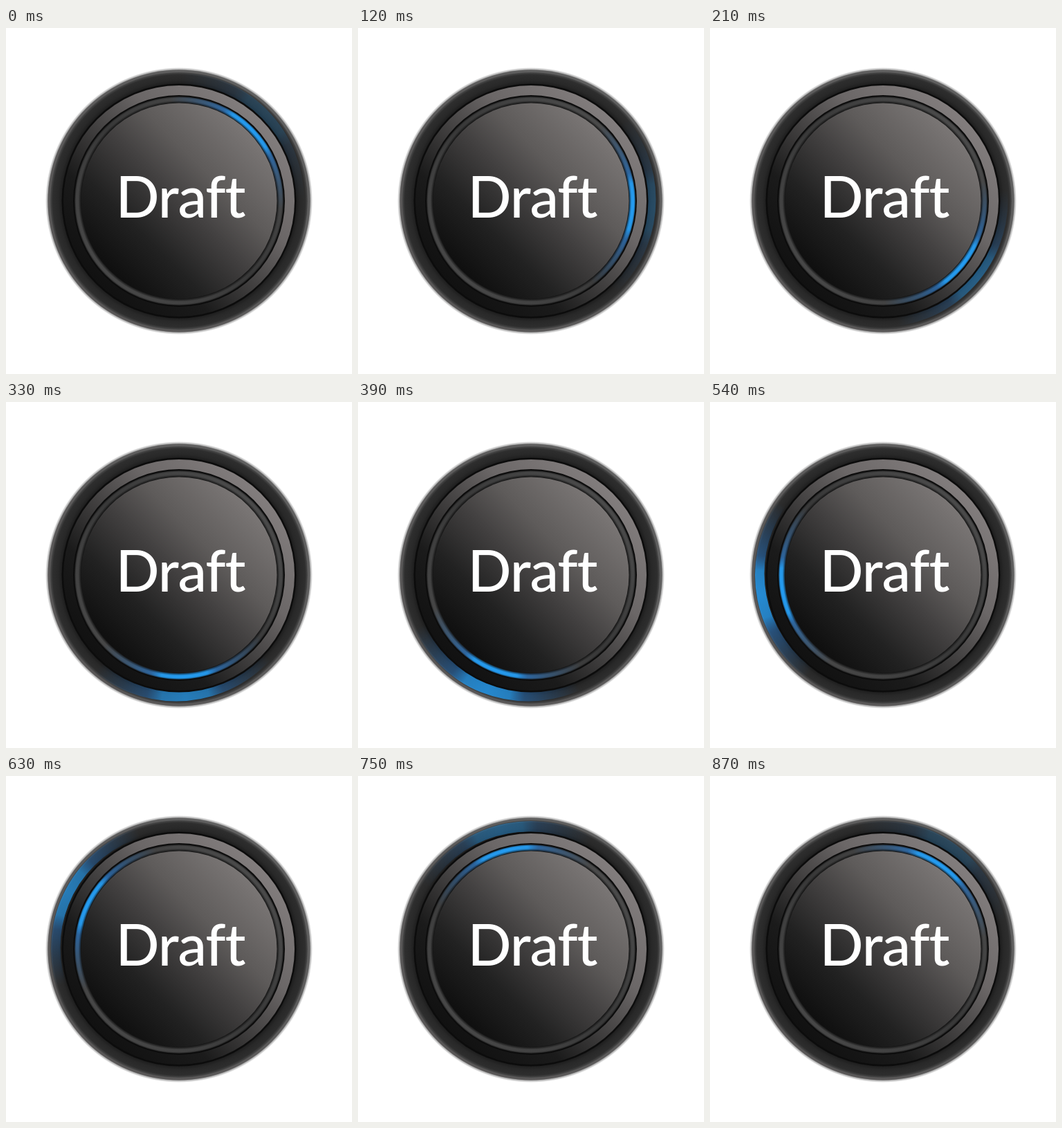
Recreate the animation shown at these times as an HTML page with a canvas. Size 500x500 px, loop 900 ms.

```html
<!DOCTYPE html>
<html lang="en">
<head>
<meta charset="utf-8">
<title>Draft</title>
<style>
  html, body { margin: 0; width: 100%; height: 100%; overflow: hidden; background: #fff; }
  canvas { display: block; }
</style>
</head>
<body>
<canvas id="stage" width="500" height="500"></canvas>
<script>
const ctx = document.getElementById('stage').getContext('2d');
const C = 250, LOOP = 900, STEP = 30, RAD = Math.PI / 180;

function circle(r, x = C, y = C) {
  ctx.beginPath();
  ctx.arc(x, y, r, 0, 2 * Math.PI);
}

function disc(r, fill) {
  ctx.fillStyle = fill;
  circle(r);
  ctx.fill();
}

function ring(r, width, stroke, x, y) {
  ctx.strokeStyle = stroke;
  ctx.lineWidth = width;
  circle(r, x, y);
  ctx.stroke();
}

function addStops(gradient, stops) {
  for (const [at, color] of stops) gradient.addColorStop(at, color);
  return gradient;
}

// Light falls from the upper right to the lower left.
function sheen(r, ...stops) {
  const d = r * Math.SQRT1_2;
  return addStops(ctx.createLinearGradient(C + d, C - d, C - d, C + d), stops);
}

function radial(from, to, ...stops) {
  return addStops(ctx.createRadialGradient(C, C, from, C, C, to), stops);
}

// Angular glow centred on the given angle; stops are [degrees from centre, color].
function glow(angle, stops) {
  const gradient = ctx.createConicGradient((angle - 180) * RAD, C, C);
  for (const [deg, color] of stops) {
    gradient.addColorStop(0.5 - deg / 360, color);
    gradient.addColorStop(0.5 + deg / 360, color);
  }
  return gradient;
}

const bright = a => `rgba(36,155,240,${a})`;
const dim = a => `rgba(36,115,195,${a})`;

function drawBody() {
  disc(193, radial(188, 193, [0, 'rgba(75,75,75,.8)'], [1, 'rgba(90,90,90,0)']));
  disc(189.5, sheen(189, [0, '#606060'], [1, '#585656']));
  disc(186, radial(168, 186, [0, '#1b1b1b'], [0.35, '#282828'], [0.8, '#2e2e2e'], [1, '#4a4a4a']));
}

// The rim reflection is strongest at the lower left and sits off-centre.
function drawReflection(angle) {
  const power = 0.55 + 0.33 * Math.cos((angle - 145) * RAD);
  ctx.save();
  circle(185);
  ctx.clip();
  ring(176, 17, glow(angle, [
    [0, bright(power)], [11, bright(power * 0.9)], [18, dim(power * 0.6)],
    [30, dim(power * 0.3)], [44, dim(0)]
  ]), C - 4, C - 2);
  ctx.restore();
}

function drawGroove() {
  disc(169.5, '#0c0c0c');
  disc(167, sheen(167, [0, '#827d7d'], [0.3, '#6b6767'], [0.5, '#474545'], [0.75, '#1b1b1b'], [1, '#111']));
  disc(153, '#0d0d0d');
  disc(151, sheen(151, [0, '#4a4a4a'], [0.5, '#383838'], [1, '#474747']));
}

function drawLamp(angle) {
  ring(146.5, 8.5, glow(angle, [
    [0, bright(1)], [13, bright(0.95)], [19, dim(0.7)], [30, dim(0.4)], [50, dim(0)]
  ]));
  disc(152, radial(141, 152, [0, 'rgba(10,10,10,.9)'], [0.4, 'rgba(10,10,10,0)'],
    [0.7, 'rgba(10,10,10,0)'], [1, 'rgba(10,10,10,.9)']));
}

function drawCap() {
  disc(141.5, sheen(141, [0, '#7a7675'], [0.3, '#5e5b5a'], [0.5, '#424040'], [0.75, '#222'], [1, '#0f0f0f']));
  ctx.fillStyle = '#fff';
  ctx.font = '500 83px Lato, sans-serif';
  ctx.letterSpacing = '-1px';
  ctx.textAlign = 'center';
  ctx.fillText('Draft', 252, 274);
}

function draw(now) {
  const time = Math.floor(now % LOOP / STEP) * STEP;
  const angle = time / LOOP * 360 - 45;

  ctx.clearRect(0, 0, 500, 500);
  drawBody();
  drawReflection(angle);
  drawGroove();
  drawLamp(angle);
  drawCap();

  requestAnimationFrame(draw);
}

requestAnimationFrame(draw);
</script>
</body>
</html>
```
